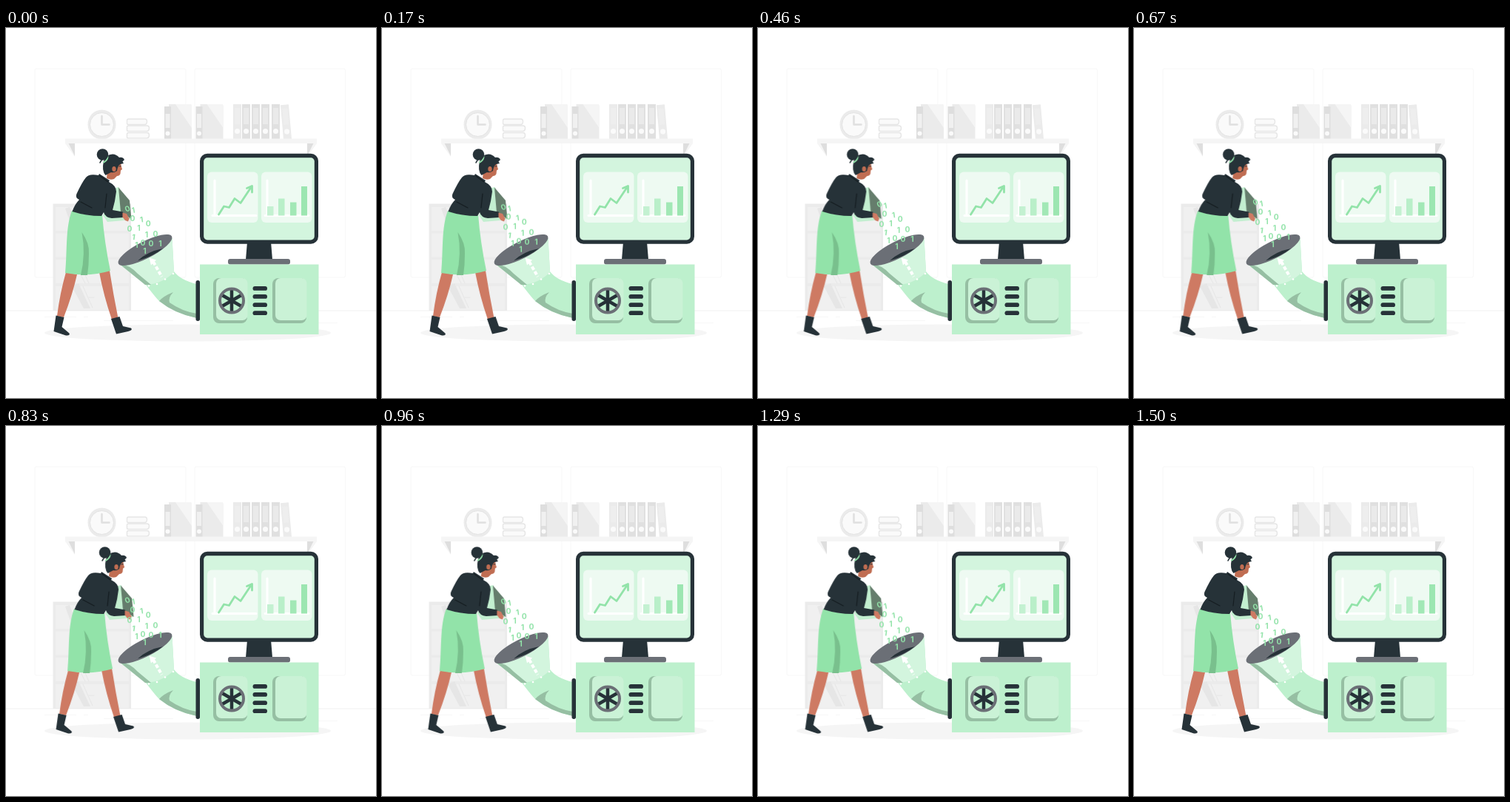
These frames come from a looping animation (500 px wide and 500 px high, 1540 ms). An HTML page without scripts:

```html
<!DOCTYPE html>
<html lang="en">
<head>
<meta charset="utf-8">
<title>Data funnel</title>
<style>
  html, body { margin: 0; width: 100%; height: 100%; overflow: hidden; background: #fff; }
  svg { display: block; width: 100vw; height: 100vh; }
  .dark { fill: #263238; }
  .grey { fill: #6b6f76; }
  .skin { fill: #ce7a63; }
  .green { fill: #92e3a9; }
  .mint { fill: #bdf0cd; }
  .shade { fill: #96bfa3; }
  .pale { fill: #d3f5de; }
  .line { fill: none; stroke-linecap: round; stroke-linejoin: round; }
  .woman { animation: shake 1540ms -10ms infinite ease; }
  .digits { font: 700 10.3px Inter, sans-serif; text-anchor: middle; animation: rise 1540ms infinite linear; }
  /* 1.5 s of motion, then a 40 ms rest */
  @keyframes shake {
    0%, 97.4%, 100% { transform: translateX(0); }
    9.74%, 87.66% { transform: translateX(-1px); }
    19.48%, 77.92% { transform: translateX(2px); }
    29.22%, 48.7%, 68.18% { transform: translateX(-4px); }
    38.96%, 58.44% { transform: translateX(4px); }
  }
  @keyframes rise {
    0%, 97.4%, 100% { transform: translateY(0); }
    48.7% { transform: translateY(-10px); }
  }
</style>
</head>
<body>
<svg viewBox="0 0 500 500" xmlns="http://www.w3.org/2000/svg">
  <defs>
    <g id="folder">
      <path fill="#ebebeb" d="M6 103H35Q37 103 37 106V150H6z"/>
      <path fill="#f5f5f5" d="M15 103H35Q37 103 37 106V135z"/>
      <path fill="#dedede" d="M0 106H9V150H0z"/>
      <path fill="#f0f0f0" d="M1.5 116H7.5V135H1.5z"/>
      <circle cx="4.500" cy="142.500" r="3" fill="#fafafa"/>
    </g>
    <g id="binder">
      <path d="M0 103H11V150H0z"/>
      <path fill="#f0f0f0" d="M2 108H9V130H2z" opacity=".65"/>
      <circle cx="5.500" cy="139.500" r="3.500" fill="#fafafa"/>
    </g>
    <path id="book" fill="#fafafa" stroke="#e6e6e6" stroke-width="1.500" d="M27 1H2Q0 1 0 3V7Q0 8.500 2 8.500H27Q30 8 30 4.500T27 1z"/>
    <g id="door">
      <rect class="shade" y="338" width="46" height="61" rx="8"/>
      <rect x="4" y="338" width="42.500" height="57" rx="7" fill="#caf2d6"/>
    </g>
    <rect id="slot" class="dark" x="333.500" width="19.500" height="5.800" rx="2.900"/>
    <rect id="cell" x="67" width="99" height="32" fill="#f0f0f0"/>
    <rect id="card" y="194.500" width="68.500" height="68.500" rx="6" fill="#eefaf2"/>
    <path id="axes" class="line" d="M8 206V253.500M5 253.500H64" stroke="#fff" stroke-width="3"/>
    <path id="spoke" d="M305 354V383" stroke="#263238" stroke-width="4.500"/>
  </defs>

  <!-- room -->
  <g fill="none" stroke="#f7f7f7">
    <rect x="39" y="55" width="204" height="282" rx="2"/>
    <rect x="255" y="55" width="203.500" height="282" rx="2"/>
    <path d="M0 382H500" stroke="#f0f0f0"/>
    <path d="M416 398.500H448M332 391.500H342M52 390.500H95M105 390.500H111M132 395.500H226"/>
  </g>

  <path fill="#ebebeb" d="M63.500 237.500H169V382H63.500z"/>
  <use href="#cell" y="242"/><use href="#cell" y="277.500"/>
  <use href="#cell" y="313"/><use href="#cell" y="349"/>
  <path fill="#e6e6e6" d="M80 244L86 242L98 274H91zM89 349L98 345L114 379H105z"/>
  <path class="line" stroke="#e6e6e6" d="M94 320L107 345M100 318L112 345M104 349L117 378M112 364H119"/>
  <ellipse cx="245.500" cy="412" rx="193.500" ry="11.500" fill="#f5f5f5"/>

  <!-- shelf -->
  <ellipse cx="129.500" cy="130.500" rx="19" ry="20" fill="#ebebeb"/>
  <circle cx="129.500" cy="130.500" r="16" fill="#fafafa" stroke="#e3e3e3"/>
  <path class="line" d="M129.500 119V130.500H139.500" stroke="#e0e0e0" stroke-width="2.500"/>
  <use href="#book" transform="translate(163.500 122) scale(.9 1)"/>
  <use href="#book" x="163.500" y="131"/><use href="#book" x="163.500" y="140.500"/>
  <use href="#folder" x="214"/><use href="#folder" x="256.500"/>
  <g fill="#e0e0e0">
    <use href="#binder" x="307" fill="#ebebeb"/><use href="#binder" x="319"/><use href="#binder" x="332"/>
    <use href="#binder" x="345"/><use href="#binder" x="359"/>
    <use href="#binder" fill="#ebebeb" transform="translate(375 0) rotate(-5 11 150)"/>
  </g>
  <path fill="#f5f5f5" d="M80 149.500H420V156L407 174V156H93V174L80 156z"/>
  <path fill="#dedede" d="M84.500 156H93V173zM407 156H415.500L407 173z"/>

  <!-- monitor -->
  <path class="dark" d="M326 289H358L360 313H324z"/>
  <rect class="grey" x="300" y="312" width="84" height="7.500" rx="3"/>
  <rect class="dark" x="262" y="169.700" width="160" height="122" rx="10"/>
  <rect class="pale" x="267.200" y="175.200" width="149.600" height="111.300" rx="5"/>
  <use href="#card" x="272"/><use href="#card" x="345"/>
  <use href="#axes" x="274"/><use href="#axes" x="345"/>
  <path class="line" d="M287.500 252L294.500 241L301.500 242.500L309 230.500L317 236.500L332 214M325.500 216.500L332.500 213.500V222" stroke="#92e3a9" stroke-width="2.800"/>
  <path fill="#c3f1d1" d="M353 241H361.500V253.500H353z"/>
  <path fill="#b9efc9" d="M368 230.500H376.500V253.500H368z"/>
  <path fill="#a2e8b6" d="M384 235.500H392.500V253.500H384z"/>
  <path fill="#9ce6b1" d="M399 214H407V253.500H399z"/>

  <!-- machine -->
  <path class="mint" d="M262 319.500H422.500V414H262z"/>
  <use href="#door" x="280"/><use href="#door" x="360"/>
  <circle cx="305" cy="368.500" r="16" fill="#bdf0cd"/>
  <use href="#spoke"/>
  <use href="#spoke" transform="rotate(60 305 368.500)"/>
  <use href="#spoke" transform="rotate(120 305 368.500)"/>
  <circle cx="305" cy="368.500" r="16" fill="none" stroke="#6b6f76" stroke-width="4"/>
  <use href="#slot" y="349"/><use href="#slot" y="360"/>
  <use href="#slot" y="371.300"/><use href="#slot" y="382.300"/>

  <!-- pipe -->
  <path class="mint" d="M153 319L189 347Q202 364 207 369Q228 386 258 392V346Q236 341 227 329L224.500 284z"/>
  <path class="pale" d="M153 319L224.500 284L227 330Q211 346 189 347z"/>
  <path class="shade" d="M153 318.500Q167 320 178 332L196 347L188 347zM207 369Q213 362 226 357Q219 364 221 371Q238 383 258 386V392Q228 386 207 369z"/>
  <rect class="dark" x="256.500" y="341" width="5.500" height="55" rx="2.700"/>
  <ellipse class="grey" cx="188" cy="300" rx="40.500" ry="11.500" transform="rotate(-27 188 300)"/>
  <path class="dark" d="M178 314.500Q191 302 212 298Q198 309 178 314.500z"/>
  <g fill="#fff">
    <path d="M193.500 310.500L203 313.500L196 320.500z"/>
    <path d="M199 316L210.500 336" stroke="#fff" stroke-width="4" stroke-dasharray="5 2.500"/>
    <circle cx="193" cy="348.500" r="1.300"/><circle cx="204" cy="346" r="1.300"/>
    <circle cx="215" cy="339.500" r="1.300"/><circle cx="226" cy="332" r="1.300"/>
  </g>

  <g class="woman">
    <!-- legs -->
    <path class="skin" d="M81 330L96 333Q90 360 78 391L69 389Q73 358 81 330zM126 330L140 328Q145 360 151.500 392L143 394Q132 362 126 330z"/>
    <path class="dark" d="M67.500 388.500L78.500 391L75.500 404L85.500 412.500Q87 416 81 415.500L64.500 410zM142 393L153.500 390L158 403L169 405.500Q172 408 165 410L149 413.500z"/>

    <!-- box -->
    <path fill="#c3efd0" d="M148 216L152.500 215L169 258L160 260L137 262L131 253z"/>
    <path fill="#657d6c" d="M152 215.500L167 233L169.500 258L155 249z"/>

    <!-- head -->
    <path fill="#c06d52" d="M138 183L155 179Q155 186 157 191L155 192.500L154.500 197Q153.500 200 150 200L146 204Q141 206 136 203z"/>
    <path class="dark" d="M132 180Q135 171 144 170.500Q149 170.500 153 175Q158 174 160 178L157.500 180.500L159 183L154.500 184Q151 186 150 193Q146 196 142 195Q138 197 134.500 199Q129 193 132 180z"/>
    <ellipse cx="146" cy="190.500" rx="2.700" ry="3.500" fill="#c06d52"/>
    <path class="line" d="M153 187L155 186.500" stroke="#263238"/>
    <path class="line" d="M132 181.500Q137 179 137.500 174" stroke="#92e3a9" stroke-width="2"/>
    <circle class="dark" cx="130.500" cy="171" r="7.800"/>
    <path class="line" d="M130 177L127 182" stroke="#263238" stroke-width="1.500"/>

    <!-- skirt -->
    <path class="green" d="M89 247Q108 255 130 252Q133 290 141 328Q112 337 80 331C83 303 80 270 89 247z"/>
    <path fill="#79c08d" d="M102.500 276Q113 291 112 305Q112 320 110 334L101 334Q108 305 102.500 276z"/>

    <!-- top -->
    <path class="dark" d="M89.500 248Q93 238 99 232Q93 229 95.500 224Q103 208 108 202Q112 196.500 125 199L126 197L140 206L139 208Q149 213 149 221L147 234L144 246L158 248.500L159 256L143 257Q134 256 132 249L129 254Q108 254 89.500 248z"/>
    <path class="line" d="M101 235L116 243M136 224L134 243M127 200L138 208" stroke="#151d21" stroke-width="1.200"/>
    <path class="skin" d="M157.500 249.500L163 251L166.500 257.500L165 261.500L161 260L157.500 255.500z"/>
  </g>

  <g class="digits green">
    <text x="164" y="248" transform="rotate(-25 164 244)">0</text>
    <text x="172" y="250" transform="rotate(-10 172 246)">1</text>
    <text x="171" y="261.500">0</text><text x="183" y="262.500" transform="rotate(-8 183 258)">1</text>
    <text x="192.300" y="268">0</text><text x="167" y="275">0</text>
    <text x="179.500" y="274.500">1</text><text x="172.500" y="286" transform="rotate(8 172 282)">1</text>
    <text x="190" y="283">1</text><text x="202" y="282">0</text>
    <text x="176.500" y="297">1</text><text x="185" y="294">0</text>
    <text x="196" y="295">0</text><text x="208.500" y="295">1</text>
    <text x="187.500" y="305">1</text>
  </g>
</svg>
</body>
</html>
```
